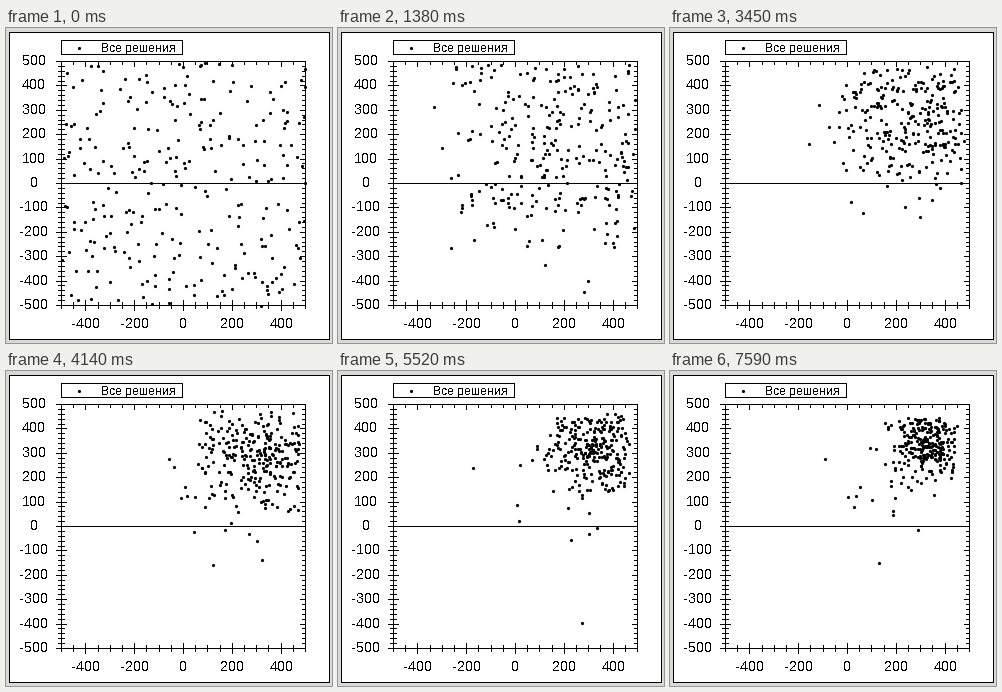
Write a matplotlib script that moves like this. It is 326 px wide and 315 px high and loops after 8000 ms.

```python
import numpy as np
import matplotlib.pyplot as plt
from matplotlib.animation import FuncAnimation
from matplotlib.collections import LineCollection
from matplotlib.patches import Rectangle

W, H, DPI = 326, 315, 100
PX = 72 / DPI                 # one pixel in points
LEFT, TOP, SIDE = 55, 33, 244
RIGHT, BOTTOM = LEFT + SIDE, TOP + SIDE
LOOP, STEP, GEN = 8000, 20, 690
POP = 270

plt.rcParams.update({
    "font.family": "Liberation Sans",
    "text.antialiased": False,
    "text.hinting": "native",
    "text.hinting_factor": 1,
    "axes.unicode_minus": False,
})


def to_px(x, y):
    x, y = np.asarray(x, float), np.asarray(y, float)
    return (np.round(LEFT + (x + 500) * SIDE / 1000),
            np.round(BOTTOM - (y + 500) * SIDE / 1000))


def cloud(gen):
    """Population that starts uniform and gathers in the upper right."""
    rng = np.random.default_rng(40 + gen)
    drift = 1 - np.exp(-gen ** 1.5 / 6.2)
    x0, y0 = -500 + 620 * drift, -500 + 630 * drift
    x1 = y1 = 500 - 5 * gen
    a, b = 1 + drift, 1 + 0.4 * drift

    n_core = int(POP * 0.25 * (gen / 10) ** 2)
    n_low, n_left = int(9 * drift), int(6 * drift)
    n = POP - n_core - n_low - n_left

    x = np.concatenate([
        x0 + (x1 - x0) * rng.beta(a, b, n),
        rng.normal(335, 40, n_core),
        rng.uniform(0, 350, n_low),
        x0 - rng.exponential(60, n_left),
    ])
    y = np.concatenate([
        y0 + (y1 - y0) * rng.beta(a, b, n),
        rng.choice([318, 408], n_core, p=[0.7, 0.3])
        + rng.normal(0, 18, n_core),
        y0 - rng.exponential(80, n_low),
        rng.uniform(100, 340, n_left),
    ])
    inside = np.maximum(abs(x), abs(y)) <= 500
    return to_px(x[inside], y[inside])


CLOUDS = [cloud(g) for g in range(11)]


def generation(frame):
    # generation 3 holds for two steps
    step = (frame * STEP + STEP // 2) // GEN
    return step if step < 4 else step - 1


fig = plt.figure(figsize=(W / DPI, H / DPI), dpi=DPI, facecolor="#d8d8d8")
ax = fig.add_axes([0, 0, 1, 1])
ax.set(xlim=(0, W), ylim=(H, 0))
ax.axis("off")


def box(x0, y0, x1, y1):
    ax.add_patch(Rectangle((x0, y0), x1 - x0, y1 - y0, fc="white",
                           ec="black", lw=PX, antialiased=False))


def label(x, y, text, size, ha):
    ax.text(x, y, text, fontsize=size * PX, color="black",
            ha=ha, va="baseline")


def dots(x, y):
    return ax.plot(x + 0.5, y + 0.5, "o", color="black", ms=3.2 * PX,
                   mew=0, zorder=4)[0]


box(3, 4, 323, 311)
box(LEFT, TOP, RIGHT, BOTTOM)
box(LEFT, 12, 176, 26)
dots(np.array([72]), np.array([19]))
label(95, 24, "Все решения", 12, "left")

lines = [[(LEFT, 155), (RIGHT, 155)]]
for v in range(-500, 501, 20):
    y = to_px(0, v)[1]
    major = v % 100 == 0
    r = 5 if major else 3
    lines += [[(LEFT - r, y), (LEFT + r, y)], [(RIGHT - r, y), (RIGHT, y)]]
    if major:
        label(28, y + 4, str(v), 14, "center")
for v in range(-500, 501, 50):
    x = to_px(v, 0)[0]
    major = v % 200 == 0
    r = 5 if major else 3
    lines += [[(x, BOTTOM - r), (x, BOTTOM + r)], [(x, TOP), (x, TOP + r)]]
    if major:
        label(x + 0.5, 300, str(v), 14, "center")
ax.add_collection(LineCollection(lines, colors="black", linewidths=PX,
                                 antialiaseds=False, zorder=2))

swarm = dots(*CLOUDS[0])


def draw(frame):
    x, y = CLOUDS[generation(frame)]
    swarm.set_data(x + 0.5, y + 0.5)
    return [swarm]


anim = FuncAnimation(fig, draw, frames=LOOP // STEP, interval=STEP,
                     repeat=True, repeat_delay=0, blit=False)
plt.show()
```
